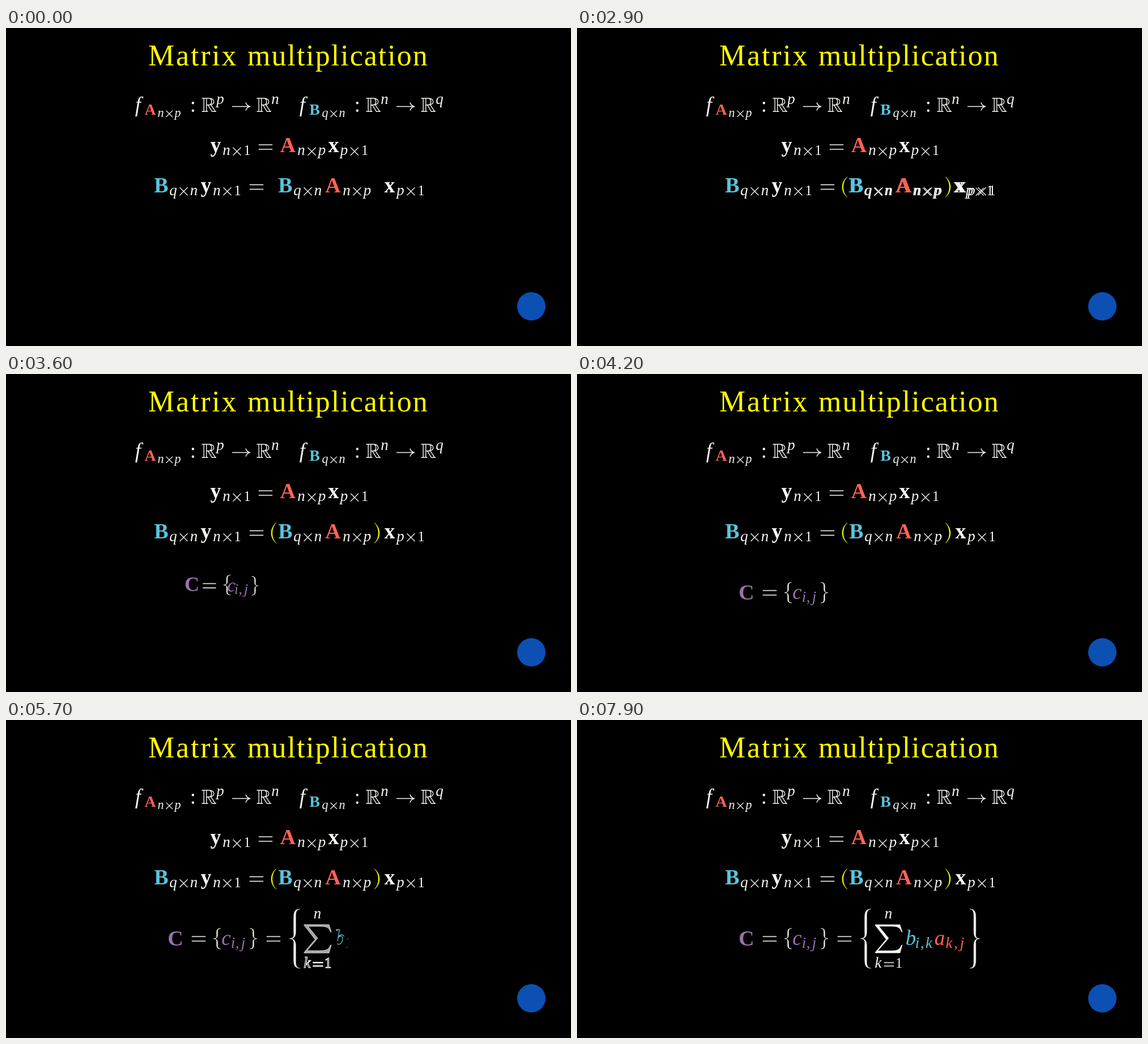
An HTML page for the animation above (8 s loop, 997 px wide and 561 px high).

```html
<!DOCTYPE html>
<html lang="en">
<head>
<meta charset="utf-8">
<title>Matrix multiplication</title>
<style>
  html, body { margin: 0; width: 100%; height: 100%; overflow: hidden; background: #000; }
  svg { display: block; width: 100vw; height: 100vh; }
  text { font-family: "Liberation Serif", "Times New Roman", serif; }
  .b { font-weight: bold; }
  .i { font-style: italic; }
</style>
</head>
<body>
<svg id="stage" viewBox="0 0 997 561"></svg>
<script>
const LOOP = 8000, STEP = 100;
const WHITE = '#f6f6f2', YELLOW = '#ffff00', RED = '#fc6255', BLUE = '#58c4dd', PURPLE = '#9a72ac';
const stage = document.getElementById('stage');

const clamp = v => Math.max(0, Math.min(1, v));
const ramp = (v, a, b) => clamp((v - a) / (b - a));
function smooth(v) {
  const sig = x => 1 / (1 + Math.exp(-x)), edge = sig(-5);
  return clamp((sig(10 * (clamp(v) - 0.5)) - edge) / (1 - 2 * edge));
}

function el(parent, tag, attrs) {
  const node = document.createElementNS('http://www.w3.org/2000/svg', tag);
  for (const k in attrs) node.setAttribute(k, attrs[k]);
  return parent.appendChild(node);
}
const group = () => el(stage, 'g', {});

function text(g, str, x, y, size, style = '', fill = WHITE) {
  const node = el(g, 'text', { x, y, 'font-size': size, class: style, fill, 'text-anchor': 'middle' });
  node.textContent = str;
  return node;
}
const line = (g, d, width = 1.5) => el(g, 'path', { d, fill: 'none', stroke: WHITE, 'stroke-width': width });
const shape = (g, d, fill = WHITE) => el(g, 'path', { d, fill, stroke: fill, 'stroke-width': 0.5 });

const bold = (g, str, x, y, fill, size = 38) => text(g, str, x, y, size, 'b', fill);
const ital = (g, str, x, y, fill, size = 37) => text(g, str, x, y, size, 'i', fill);
const script = (g, str, x, y, fill, size = 27) => ital(g, str, x, y, fill, size);

// Subscript of the form "n×p", starting at the left edge x
function dims(g, str, x, y, k = 1) {
  [...str].forEach((c, i) => {
    const cx = x + [8, 26.5, 44.5][i] * k;
    if (c === '×') {
      const r = 7 * k, cy = y - 6.3 * k;
      line(g, `M${cx - r} ${cy - r}l${2 * r} ${2 * r}m0 ${-2 * r}l${-2 * r} ${2 * r}`, 1.3);
    } else text(g, c, cx, y, (c === '1' ? 24.5 : 27) * k, c === '1' ? '' : 'i');
  });
}

function equals(g, x, y, w = 24, gap = 8) {
  return shape(g, `M${x} ${y - gap / 2 - 0.6}h${w}v1.2h${-w}zm0 ${gap}h${w}v1.2h${-w}z`);
}

function doubleR(g, x, y) {
  line(g, `M${x} ${y - 0.7}h11M${x} ${y - 24}h13c11 0 11 11.8 0 11.8h-4.5`
    + `M${x + 3.7} ${y - 24}v23.3M${x + 8.3} ${y - 24}v23.3`
    + `M${x + 14} ${y - 24}c4.5 3 4.5 8.8 0 11.8`
    + `M${x + 11} ${y - 12.2}l7 11.5h7.5M${x + 16} ${y - 12.6}l8 11.9`, 1.4);
}

function arrow(g, x, y) {
  line(g, `M${x} ${y}h31m-7-7q2 6 8 7q-6 1-8 7`);
}

function paren(g, x, y, dir) {
  const h = 18, w = 10 * dir;
  return shape(g, `M${x} ${y - h}C${x - w * 1.2} ${y - h / 2} ${x - w * 1.2} ${y + h / 2} ${x} ${y + h}`
    + `C${x - w * 0.95} ${y + h / 2} ${x - w * 0.95} ${y - h / 2} ${x} ${y - h}z`, YELLOW);
}

// Curly brace: tip is the outer point, end the inner one; h is half the stem weight
function brace(g, tip, end, top, bottom, r, h) {
  const m = (top + bottom) / 2, dir = Math.sign(end - tip), c = (tip + end) / 2;
  const a = c + h * dir, b = c - h * dir, q = 1.2 * r, notch = tip + 2 * h * dir;
  return shape(g, `M${end} ${bottom}C${a} ${bottom - 1} ${a} ${bottom - r * 0.5} ${a} ${bottom - q}`
    + `V${m + r}C${a} ${m + r * 0.4} ${c} ${m + 1} ${notch} ${m}`
    + `C${c} ${m - 1} ${a} ${m - r * 0.4} ${a} ${m - r}V${top + q}`
    + `C${a} ${top + r * 0.5} ${a} ${top + 1} ${end} ${top}`
    + `C${c} ${top} ${b} ${top + r * 0.4} ${b} ${top + q}V${m - r}`
    + `C${b} ${m - r * 0.4} ${c} ${m - 1} ${tip} ${m}`
    + `C${c} ${m + 1} ${b} ${m + r * 0.4} ${b} ${m + r}V${bottom - q}`
    + `C${b} ${bottom - r * 0.4} ${c} ${bottom} ${end} ${bottom}z`);
}

function sigma(g) {
  return shape(g, 'M526 361H570L574 374H572.5C571 367 566 364 556 364H533L550 385L531 407H556'
    + 'C566 407 570 404 572.5 397H574L570 411H526V410L545.5 387L526 362z');
}

// Title and the fixed rows
const base = group();
function word(str, x, spacing) {
  el(base, 'text', { x, y: 65.5, 'font-size': 52, fill: YELLOW, 'letter-spacing': spacing }).textContent = str;
}
word('Matrix', 251, 2.8);
word('multiplication', 426, 2);

function mapping(x, name, fill, size, from, to) {
  ital(base, 'f', x + 7, 148);
  bold(base, name, x + 28.5, 153, fill, 28);
  dims(base, size, x + 40.5, 156.5, 0.82);
  text(base, ':', x + 104, 148, 37);
  doubleR(base, x + 119.5, 148);
  script(base, from, x + 152, 134);
  arrow(base, x + 173, 138.5);
  doubleR(base, x + 216.5, 148);
  script(base, to, x + 249, 134);
}
mapping(226, 'A', RED, 'n×p', 'p', 'n');
mapping(516, 'B', BLUE, 'q×n', 'n', 'q');

bold(base, 'y', 370, 219);
dims(base, 'n×1', 381, 224);
equals(base, 446, 210);
bold(base, 'A', 497.5, 219, RED);
dims(base, 'n×p', 513, 224);
bold(base, 'x', 578, 219);
dims(base, 'p×1', 588.5, 224);

bold(base, 'B', 274, 289.5, BLUE);
dims(base, 'q×n', 287, 294.5);
bold(base, 'y', 353, 289.5);
dims(base, 'n×1', 364, 294.5);
equals(base, 430, 280.5);

el(base, 'circle', { cx: 927, cy: 491, r: 25, fill: '#0c50b4' });

const product = [
  g => bold(g, 'B', 493, 289.5, BLUE),
  g => dims(g, 'q×n', 506, 294.5),
  g => bold(g, 'A', 577, 289.5, RED),
  g => dims(g, 'n×p', 593, 294.5),
  g => bold(g, 'x', 677, 289.5),
  g => dims(g, 'p×1', 688, 294.5)
];
product.forEach(draw => draw(base));

const matrixC = [
  g => bold(g, 'C', 299, 397.5, PURPLE),
  g => equals(g, 328, 386),
  g => brace(g, 366, 379, 367.5, 404, 7, 0.9),
  g => ital(g, 'c', 388.5, 397, PURPLE),
  g => ['i', ',', 'j'].forEach((c, i) => script(g, c, [400.5, 408, 418.5][i], 402, PURPLE)),
  g => brace(g, 443, 430, 367.5, 404, 7, 0.9)
];

// Each part: start, end, how fast it moves sideways, and its scale in passing
const routes = [
  [[493, 277], [299, 386], 1, 0.72],
  [[524, 286], [340, 386], 1.2, 0.65],
  [[577, 277], [372, 386], 1.3, 0.75],
  [[620, 288], [388, 390], 1.7, 0.4],
  [[677, 281], [410, 394], 2.05, 0.65],
  [[712, 288], [437, 386], 2.4, 0.4]
];
const morphs = routes.map(([from, to, rate, small], i) => {
  const source = group(), target = group();
  product[i](source);
  matrixC[i](target);
  return { source, target, from, to, rate, small };
});

function place(node, [x, y], [ox, oy], scale, opacity) {
  node.setAttribute('transform', `translate(${x} ${y}) scale(${scale}) translate(${-ox} ${-oy})`);
  node.setAttribute('opacity', opacity);
  node.style.display = opacity > 0 ? '' : 'none';
}

function drawMorph(t) {
  const a = smooth(ramp(t, 2830, 3980));
  for (const { source, target, from, to, rate, small } of morphs) {
    const at = [rate, 1.1].map((k, i) => to[i] + (from[i] - to[i]) * (1 - a) ** k);
    const shrink = Math.max(0.2, 1 - (1 - small) * a / 0.28);
    place(source, at, from, shrink, a > 0 ? 1 - ramp(a, 0.25, 0.6) : 0);
    place(target, at, to, small + (1 - small) * a, ramp(a, 0.15, 0.55));
  }
}

// Glyphs that are outlined first and filled afterwards
const written = [];
const w = group();
function write(nodes, start, lag, duration) {
  nodes.forEach((node, i) => {
    const isText = node.tagName === 'text';
    const length = isText ? node.getAttribute('font-size') * 2.8 : node.getTotalLength();
    node.setAttribute('stroke', node.getAttribute('fill'));
    written.push({ node, length, rest: isText ? 0 : 0.5, start: start + i * lag, duration });
  });
}
write([paren(w, 477, 280.5, 1), paren(w, 650, 280.5, -1)], 850, 200, 850);
write([
  equals(w, 460, 386),
  brace(w, 500, 519, 333.5, 438, 13, 1.8),
  script(w, 'n', 549.5, 350),
  sigma(w),
  script(w, 'k', 531.5, 437),
  equals(w, 542, 431, 17, 6),
  text(w, '1', 568, 437, 24.5),
  ital(w, 'b', 589, 397, BLUE),
  script(w, 'i', 600.5, 402, BLUE),
  script(w, ',', 609, 402, BLUE),
  script(w, 'k', 621, 402, BLUE),
  ital(w, 'a', 640, 397, RED),
  script(w, 'k', 656.5, 402, RED),
  script(w, ',', 668.5, 402, RED),
  script(w, 'j', 679.5, 402, RED),
  brace(w, 711, 693, 333.5, 438, 13, 1.8)
], 4850, 100, 700);

function drawWritten(t) {
  for (const { node, length, rest, start, duration } of written) {
    const p = ramp(t, start, start + duration);
    const outline = smooth(2 * p), fill = smooth(2 * p - 1);
    node.style.display = p > 0 ? '' : 'none';
    node.setAttribute('fill-opacity', fill);
    node.setAttribute('stroke-width', rest + (1.3 - rest) * (1 - fill));
    node.setAttribute('stroke-dasharray', p < 0.5 ? `${outline * length} 2000` : 'none');
  }
}

function render(time) {
  const t = Math.floor((time % LOOP) / STEP) * STEP;
  drawMorph(t);
  drawWritten(t);
}

const began = performance.now();
function tick() {
  render(performance.now() - began);
  requestAnimationFrame(tick);
}
tick();
</script>
</body>
</html>
```
